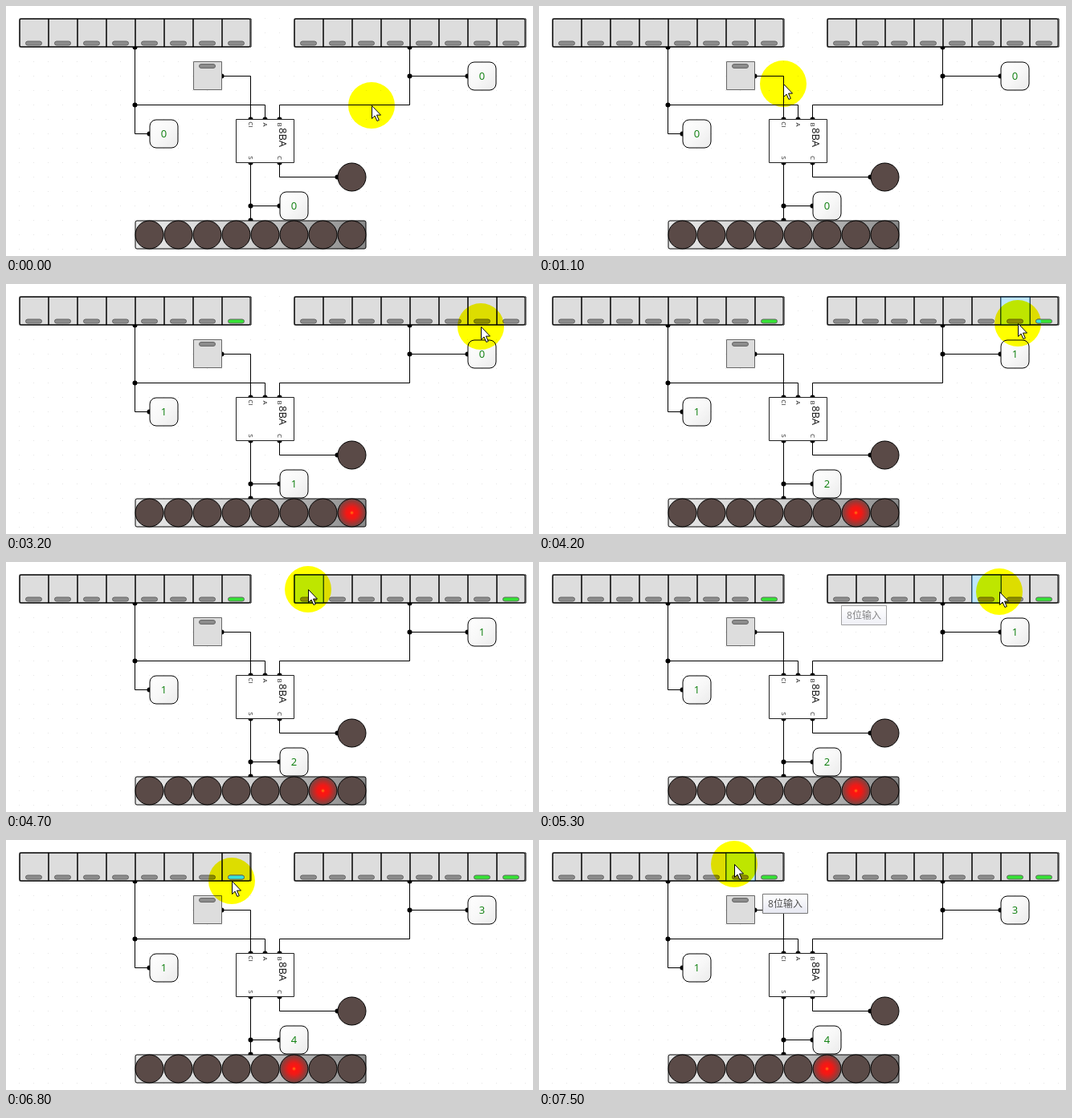
Recreate the animation shown at these times as an HTML page with a canvas. Size 656 by 312 pixels, loop 8000 ms.

```html
<!DOCTYPE html>
<html lang="zh">
<head>
<meta charset="utf-8">
<title>8-bit adder</title>
<style>
html, body { margin: 0; width: 656px; height: 312px; overflow: hidden; background: #fff; }
canvas { display: block; }
</style>
</head>
<body>
<canvas id="stage" width="656" height="312"></canvas>
<script>
const ctx = document.getElementById('stage').getContext('2d');
const LOOP = 8000, STEP = 100, GRID = 18, CELL = 2 * GRID;
const BITS = [0, 1, 2, 3, 4, 5, 6, 7];
const A_LEFT = 17, B_LEFT = 359, HALO = 29;

// Grid steps to pixel centres
const gx = n => 16.5 + GRID * n;
const gy = n => 15.5 + GRID * n;

// Pointer stops: time, then the place reached
const keySpot = (left, i) => [left + CELL * (i + .5), 47];
const visits = [
  [0, 455, 124],
  [700, gx(10), gy(8)],
  [1100, 304, 97],
  [1600, ...keySpot(A_LEFT, 7)],
  [2400, 419, 78],
  [3500, ...keySpot(B_LEFT, 7)],
  [4100, ...keySpot(B_LEFT, 7)],
  [4200, 596, 49],
  [4700, 376, 34],
  [5300, 573, 37],
  [5700, ...keySpot(B_LEFT, 6)],
  [6800, 281, 51],
  [7500, 243, 30]
];

function pointerAt(t) {
  const i = visits.findIndex(v => v[0] > t);
  if (i < 0) return { x: visits.at(-1)[1], y: visits.at(-1)[2] };
  const [t0, x0, y0] = visits[i - 1], [t1, x1, y1] = visits[i];
  const u = (t - t0) / (t1 - t0), e = u * u * (3 - 2 * u);
  return { x: Math.round(x0 + (x1 - x0) * e), y: Math.round(y0 + (y1 - y0) * e) };
}

function paint(fill, stroke = '#000') {
  if (fill) { ctx.fillStyle = fill; ctx.fill(); }
  if (stroke) { ctx.strokeStyle = stroke; ctx.lineWidth = 1; ctx.stroke(); }
}

function box(x, y, w, h, r, fill, stroke) {
  ctx.beginPath();
  ctx.roundRect(x, y, w, h, r);
  paint(fill, stroke);
}

function disc(x, y, r, fill, stroke) {
  ctx.beginPath();
  ctx.arc(x, y, r, 0, 7);
  paint(fill, stroke);
}

function text(str, x, y, size, color, turned) {
  ctx.save();
  ctx.translate(x, y);
  if (turned) ctx.rotate(Math.PI / 2);
  ctx.font = `${size}px "Open Sans", "Noto Sans CJK SC", "Noto Sans CJK", sans-serif`;
  ctx.textAlign = 'center';
  ctx.fillStyle = color;
  ctx.fillText(str, 0, size * .36);
  ctx.restore();
}

function gradient(x0, y0, x1, y1, ...colors) {
  const g = ctx.createLinearGradient(x0, y0, x1, y1);
  colors.forEach((c, i) => g.addColorStop(i / (colors.length - 1), c));
  return g;
}

function grid() {
  ctx.fillStyle = '#e6e6e6';
  for (let x = 16; x < 656; x += GRID)
    for (let y = 15; y < 312; y += GRID) ctx.fillRect(x, y, 1, 1);
}

// A wire alternates direction at each turn and has a dot at both ends
function wire(x, y, vertical, ...lengths) {
  const start = [gx(x), gy(y)];
  ctx.beginPath();
  ctx.moveTo(...start);
  for (const n of lengths) {
    if (vertical) y += n; else x += n;
    vertical = !vertical;
    ctx.lineTo(gx(x), gy(y));
  }
  paint(null);
  disc(...start, 3, '#000', null);
  disc(gx(x), gy(y), 3, '#000', null);
}

function wires() {
  wire(8, 2, true, 6, 1);
  wire(8, 6, false, 9, 1);
  wire(14, 4, false, 2, 3);
  wire(27, 2, true, 4, -9, 1);
  wire(27, 4, false, 4);
  wire(18, 10, true, 1, 4);
  wire(16, 10, true, 4);
  wire(16, 13, false, 2);
}

const isOn = (value, i) => value >> (7 - i) & 1;

function key(x, y, color) {
  box(x, y, 20, 5, 2.5, color, '#666');
}

function rowKey(left, i, color) {
  key(left + 7.5 + CELL * i, 44, color);
}

function switches(left, value, p) {
  box(left, 16, 287, 35, 2, '#ddd', null);
  for (const i of BITS) box(left + CELL * i, 16, CELL, 35, 0, null);
  const over = Math.floor((p.x - left) / CELL);
  if (BITS.includes(over) && p.y > 15 && p.y < 51)
    box(left + CELL * over, 16, CELL, 35, 0, '#bee6fd', '#2c628b');
  box(left, 16, 287, 35, 2, null);
  for (const i of BITS) rowKey(left, i, isOn(value, i) ? '#35e235' : '#8c8c8c');
}

// A counter hangs on the wire end at its left edge
function counter(col, row, value) {
  const x = gx(col), y = gy(row);
  box(x + .5, y - 17.5, 35, 35, 8,
    gradient(x, y - GRID, x + CELL, y + GRID, '#fff', '#f8f8f8', '#eaeaea'));
  text(value, x + GRID, y, 13, '#0a7d0a');
}

function lamp(x, y, on) {
  let fill = '#5a4a47';
  if (on) {
    fill = ctx.createRadialGradient(x, y, 0, x, y, GRID);
    fill.addColorStop(0, '#ff7a10');
    fill.addColorStop(.15, '#ff1410');
    fill.addColorStop(.4, '#ee1a17');
    fill.addColorStop(1, '#6b4a47');
  }
  disc(x, y, 17.5, fill);
}

function lampRow(value) {
  box(161, 268, 287, 35, 2, gradient(161, 268, 448, 303, '#e8e8e8', '#d0d0d0', '#888'));
  for (const i of BITS) lamp(gx(9 + 2 * i), gy(15), isOn(value, i));
}

function adder() {
  box(286.5, 141.5, 72, 54, 0, '#fff', '#222');
  ['CI', 'A', 'B'].forEach((s, i) => text(s, gx(16 + i), 148, 8, '#222', true));
  ['S', '', 'C'].forEach((s, i) => text(s, gx(16 + i), 189.5, 8, '#222', true));
  text('8BA', 345, 164, 13, '#111', true);
}

function tooltip(x, y, alpha) {
  ctx.globalAlpha = alpha;
  box(x + .5, y + .5, 56, 24, 0, gradient(0, y, 0, y + 25, '#fff', '#e6e7f1'), '#767676');
  text('8位输入', x + 28.5, y + 12.5, 12, '#4c4c4c');
  ctx.globalAlpha = 1;
}

function halo(p, rows) {
  ctx.save();
  ctx.globalCompositeOperation = 'multiply';
  disc(p.x, p.y, HALO, '#ff0', null);
  ctx.globalCompositeOperation = 'source-over';
  // Lit keys turn cyan under the halo
  ctx.clip();
  for (const [left, value] of rows)
    for (const i of BITS) if (isOn(value, i)) rowKey(left, i, '#35e2dc');
  ctx.restore();
}

function arrow({ x, y }) {
  ctx.save();
  ctx.translate(x + .5, y + .5);
  paintPath('M0 0V16L3.6 12.6L6.4 19L8.8 18L6 11.6H11Z', '#fff');
  ctx.restore();
}

function paintPath(d, fill) {
  const shape = new Path2D(d);
  ctx.fillStyle = fill;
  ctx.strokeStyle = '#000';
  ctx.lineWidth = 1;
  ctx.fill(shape);
  ctx.stroke(shape);
}

function draw(t) {
  const p = pointerAt(t);
  const a = t >= 1600 ? 1 : 0;
  const b = t >= 5700 ? 3 : t >= 3600 ? 1 : 0;

  ctx.fillStyle = '#fff';
  ctx.fillRect(0, 0, 656, 312);
  grid();
  wires();
  switches(A_LEFT, a, p);
  switches(B_LEFT, b, p);
  box(233.5, 69.5, 35, 35, 0, '#ddd', '#666');
  key(240.5, 72.5, '#8c8c8c');
  adder();
  counter(31, 4, b);
  counter(9, 8, a);
  counter(18, 13, a + b);
  lamp(gx(23), gy(11), false);
  lampRow(a + b);

  if (t >= 4900 && t < 5500) tooltip(376, 54, Math.min(1, (5500 - t) / 300));
  if (t >= 7300) tooltip(278, 67, 1);
  halo(p, [[A_LEFT, a], [B_LEFT, b]]);
  arrow(p);
}

function tick() {
  const t = performance.now() % LOOP;
  draw(Math.floor(t / STEP) * STEP);
  requestAnimationFrame(tick);
}
tick();
</script>
</body>
</html>
```
